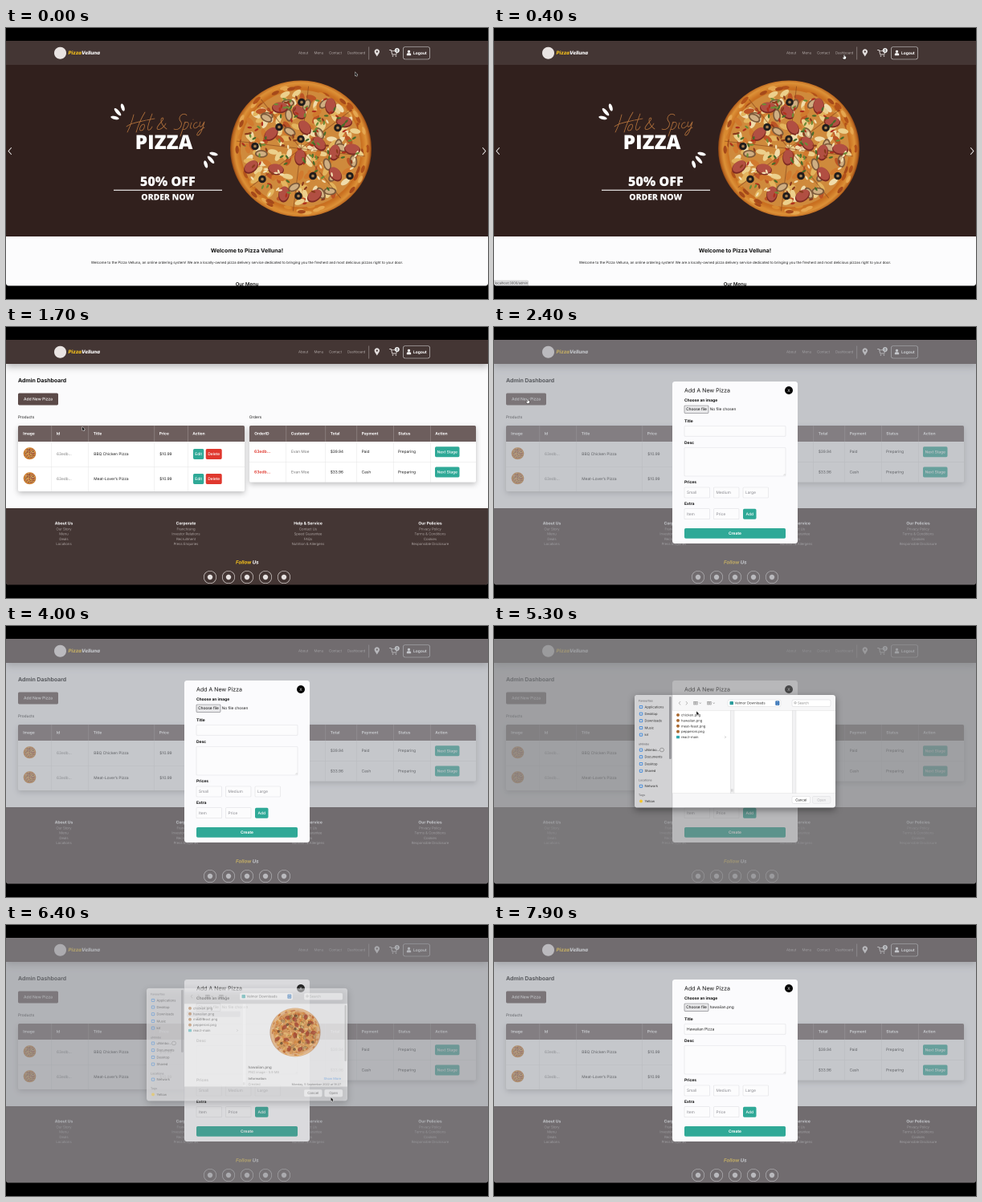
An HTML page with a canvas that plays this animation: 600 px wide and 338 px high, repeating every 8000 ms.

```html
<!DOCTYPE html>
<html lang="en">
<head>
<meta charset="utf-8">
<title>Pizza ordering dashboard</title>
<style>
html, body { margin: 0; width: 100%; height: 100%; overflow: hidden; background: #000; }
canvas { display: block; width: 600px; height: 338px; }
</style>
</head>
<body>
<canvas id="stage"></canvas>
<script>
const LOOP = 8000, BROWN = '#443634', TEAL = '#2fa997', RED = '#e0382e', YELLOW = '#f6c21c';
const canvas = document.getElementById('stage');
// Supersampled so that tiny text stays evenly spaced and soft.
const ratio = 2 * (window.devicePixelRatio || 1);
canvas.width = 600 * ratio;
canvas.height = 338 * ratio;
const ctx = canvas.getContext('2d');
ctx.textRendering = 'geometricPrecision';

const clamp = v => Math.max(0, Math.min(1, v));
const progress = (t, a, b) => clamp((t - a) / (b - a));
const ease = p => p * p * (3 - 2 * p);

function text(str, x, y, size, color = '#222', opts = {}) {
  const { weight = 400, align = 'left', italic = '', family = 'Inter' } = opts;
  ctx.font = `${italic} ${weight} ${size}px "${family}", sans-serif`;
  ctx.textAlign = align;
  ctx.textBaseline = opts.base || 'middle';
  ctx.fillStyle = color;
  ctx.fillText(str, x, y);
  return ctx.measureText(str).width;
}
const bold = (str, x, y, size, color, align) => text(str, x, y, size, color, { weight: 700, align });
const centered = (str, x, y, size, color, weight) => text(str, x, y, size, color, { weight, align: 'center' });

function rect(x, y, w, h, color) {
  ctx.fillStyle = color;
  ctx.fillRect(x, y, w, h);
}
function box(x, y, w, h, r, fill, stroke, width = .6) {
  ctx.beginPath();
  ctx.roundRect(x, y, w, h, r);
  if (fill) { ctx.fillStyle = fill; ctx.fill(); }
  if (stroke) { ctx.strokeStyle = stroke; ctx.lineWidth = width; ctx.stroke(); }
}
function disc(x, y, r, fill, stroke, width = .7) {
  ctx.beginPath();
  ctx.arc(x, y, r, 0, 7);
  if (fill) { ctx.fillStyle = fill; ctx.fill(); }
  if (stroke) { ctx.strokeStyle = stroke; ctx.lineWidth = width; ctx.stroke(); }
}
function oval(x, y, rx, ry, angle, fill) {
  ctx.beginPath();
  ctx.ellipse(x, y, rx, ry, angle, 0, 7);
  ctx.fillStyle = fill;
  ctx.fill();
}
function path(d, color, width = .8) {
  ctx.strokeStyle = color;
  ctx.lineWidth = width;
  ctx.lineCap = ctx.lineJoin = 'round';
  ctx.stroke(new Path2D(d));
}
function shadowed(draw, blur, dy, color) {
  ctx.save();
  ctx.shadowColor = color;
  ctx.shadowBlur = blur * ratio;
  ctx.shadowOffsetY = dy * ratio;
  draw();
  ctx.restore();
}
function button(label, x, y, w, h, color, size = 4.8, weight = 500) {
  box(x, y, w, h, 2, color);
  centered(label, x + w / 2, y + h / 2 + .2, size, '#fff', weight);
}

function pizza(cx, cy, radius) {
  let seed = 7;
  const rand = () => (seed = seed * 16807 % 2147483647) / 2147483647;
  const scatter = (n, inner, outer, draw) => {
    for (let i = 0; i < n; i++) {
      const a = rand() * 6.283, d = Math.sqrt(inner * inner + rand() * (outer * outer - inner * inner));
      draw(Math.cos(a) * d, Math.sin(a) * d * .97, rand() * 3.14, i);
    }
  };
  ctx.save();
  ctx.translate(cx, cy);
  ctx.scale(radius / 88, radius / 88);
  const crust = ctx.createRadialGradient(0, 0, 68, 0, 0, 88);
  crust.addColorStop(0, '#c4641c');
  crust.addColorStop(.4, '#cb7222');
  crust.addColorStop(.7, '#dd9238');
  crust.addColorStop(.9, '#b9651f');
  crust.addColorStop(1, '#7c3c14');
  oval(0, 0, 88, 85, 0, crust);
  scatter(60, 73, 84, (x, y, a, i) =>
    oval(x, y, 5, 2.2, Math.atan2(y, x) + 1.57, ['#b2521a', '#e5a650', '#a5491a', '#d98a30'][i % 4]));
  oval(0, 0, 75, 73, 0, '#cf8a3c');
  scatter(150, 0, 73, (x, y, a, i) =>
    oval(x, y, 6.5, 3.2, a, ['#ecd08c', '#d17a2e', '#f0dcab', '#bc5425', '#e3b45e'][i % 5]));
  for (let k = 0; k < 4; k++) {
    const a = .12 + k * Math.PI / 4, x = Math.cos(a) * 80, y = Math.sin(a) * 78;
    path(`M${-x} ${-y}L${x} ${y}`, 'rgba(130,65,25,.6)', 1);
  }
  scatter(18, 15, 68, (x, y, a) => {
    oval(x, y, 8, 4.8, a, '#7d5a3a');
    oval(x, y, 6, 3.2, a, '#cfae82');
  });
  const meat = [[-26, -52], [-2, -46], [37, -54], [-37, -19], [54, -34], [23, -7], [-1, 10], [-62, 22],
    [64, 0], [43, 31], [-21, 56], [17, 58], [-31, 25], [5, -27], [42, 4]];
  meat.forEach(([x, y], i) => {
    oval(x, y + 1, 10, 6.8, i * .8, '#7d2a22');
    oval(x, y, 9, 6, i * .8, '#b14f42');
  });
  scatter(150, 0, 72, (x, y, a, i) =>
    oval(x, y, 2.8, 1.2, a, ['#6d8c35', '#b0301d', '#486b29', '#f3e0b2', '#8a3b1c'][i % 5]));
  const olives = [[1, -58], [46, -26], [-57, -3], [0, -12], [-48, 38], [15, 34], [61, 34], [-3, 59], [-27, -27]];
  olives.forEach(([x, y]) => {
    disc(x, y, 4.8, '#211d1c');
    disc(x, y, 1.8, '#a87f4d');
  });
  ctx.restore();
}

function header() {
  rect(0, 16, 600, 30, BROWN);
  disc(67.5, 31.2, 7.5, '#e9e4e2');
  const brand = { weight: 800, italic: 'italic' };
  const w = text('Pizza', 77.5, 31.3, 6.1, YELLOW, brand);
  text('Velluna', 77.5 + w, 31.3, 6.1, '#fff', brand);
  [['About', 364], ['Menu', 383.5], ['Contact', 402], ['Dashboard', 425]]
    .forEach(([s, x]) => text(s, x, 31.2, 4.4, '#cfc8c6', { weight: 300 }));
  rect(451.5, 23.5, .6, 16, '#a99f9d');
  ctx.fillStyle = '#e4dfde';
  ctx.fill(new Path2D('M461.8 35.5C460 32.5 458.6 31 458.6 29.5A3.2 3.2 0 0 1 465 29.5C465 31 463.6 32.5 461.8 35.5Z'));
  disc(461.8, 29.5, 1.1, BROWN);
  path('M477.5 27.5h1.8l1.5 5.5h5l1.2-4.3h-7.2', '#ddd6d4', .9);
  disc(481.5, 35, .8, '#ddd6d4');
  disc(485.5, 35, .8, '#ddd6d4');
  disc(486.8, 28, 3, '#fff');
  centered('0', 486.8, 28.3, 4.4, '#222', 600);
  box(494.5, 23.5, 33, 15.5, 2.5, null, '#ddd', .6);
  disc(501.5, 29.3, 1.6, '#fff');
  box(498.8, 31.3, 5.4, 3, [2, 2, .5, .5], '#fff');
  bold('Logout', 507, 31.4, 4.9, '#fff');
}

const LETTERING = 'M159 108C157 116 154 124 151 130M173 105C168 113 164 123 162 130M150 123C156 118 168 117 174 115'
  + 'M171 120c-4 1-6 8-3 8c4 0 6-8 3-8M182 107C179 115 175 125 177 127c2 1 4-2 5-4M175 115l10-2'
  + 'M200 126C193 121 191 113 195 112C199 113 188 121 188 125C189 129 196 125 199 119'
  + 'M225 109C221 104 213 111 217 116C221 120 216 129 209 126M223 117L217 135M222 119c4-4 7 0 4 4c-2 4-6 4-6 3'
  + 'M231 118c-2 5-2 8 0 7M233 114v.3M238 118c-4-1-6 6-3 7c2 0 4-2 5-3'
  + 'M242 117c-2 5-1 8 2 5l3-5c-2 8-5 16-8 17c-4 0 2-7 8-10';

function sparks() {
  oval(135.5, 112, 5.3, 2, .25, '#fff');
  oval(139, 104.7, 6, 2.1, .85, '#fff');
  oval(145.3, 99, 4.8, 2.1, 1.25, '#fff');
}

function home(t) {
  rect(0, 16, 600, 306, '#fcfcfd');
  rect(0, 46, 600, 214, '#31201d');
  header();
  path(LETTERING, '#b5733c', .8);
  sparks();
  ctx.save();
  ctx.translate(394, 269);
  ctx.rotate(Math.PI);
  sparks();
  ctx.restore();
  const display = (s, x, y, size) => text(s, x, y, size, '#fff',
    { weight: 800, align: 'center', family: 'Open Sans', base: 'alphabetic' });
  display('PIZZA', 196.5, 150.8, 24.5);
  display('50% OFF', 201.3, 197.2, 16.2);
  display('ORDER NOW', 201.3, 214.6, 10.4);
  rect(134, 201.7, 135, 1.1, '#fff');
  pizza(367, 150.5, 88);
  path('M6.5 149.5L3 153.5L6.5 157.5M593.5 149.5L597 153.5L593.5 157.5', '#fff', .9);
  bold('Welcome to Pizza Velluna!', 300, 277.7, 7, '#111', 'center');
  centered('Welcome to the Pizza Velluna, an online ordering system! We are a locally-owned pizza delivery service '
    + 'dedicated to bringing you the freshest and most delicious pizzas right to your door.', 300, 292.7, 4.4, '#222');
  centered('Our Menu', 300, 319.6, 6, '#111', 600);
  if (t >= 300) {
    box(-1, 315, 43.5, 8, 1, '#dedee0', '#aaa', .4);
    text('localhost:3000/admin', 1, 318.5, 4, '#444');
  }
}

function table(x, widths, heads, rowHeight) {
  const h = 20 + rowHeight * 2;
  shadowed(() => box(x, 123, 282, h, 2, '#fff'), 7, 2.5, 'rgba(0,0,0,.24)');
  box(x, 123, 282, 20, [2, 2, 0, 0], '#6d5e5d');
  rect(x, 143 + rowHeight, 282, .5, '#e5e5e5');
  let left = x;
  heads.forEach((head, i) => {
    bold(head, left + 6.3, 133.2, 4.8, '#fff');
    if (i) {
      rect(left, 123, .6, 20, '#9a8f8e');
      rect(left, 143, .5, rowHeight * 2, '#e5e5e5');
    }
    left += widths[i];
  });
}

const LINKS = [
  ['About Us', 'Our Story', 'Menu', 'Deals', 'Locations'],
  ['Corporate', 'Franchising', 'Investor Relations', 'Recruitment', 'Press Enquiries'],
  ['Help & Service', 'Contact Us', 'Speed Guarantee', 'FAQs', 'Nutrition & Allergens'],
  ['Our Policies', 'Privacy Policy', 'Terms & Conditions', 'Cookies', 'Responsible Disclosure']
];

function dashboard() {
  rect(0, 16, 600, 306, '#fbfbfc');
  shadowed(() => rect(0, 16, 600, 30, BROWN), 9, 3, 'rgba(0,0,0,.3)');
  header();
  bold('Admin Dashboard', 15, 66.7, 6.9, '#111');
  button('Add New Pizza', 15, 82.5, 50, 15, '#5b4a48', 5);
  text('Products', 15, 112.7, 4.8);
  text('Orders', 302.7, 112.7, 4.8);

  table(15, [41.5, 46, 82, 41.5, 71], ['Image', 'Id', 'Title', 'Price', 'Action'], 31);
  ['BBQ Chicken Pizza', 'Meat-Lover\u2019s Pizza'].forEach((title, i) => {
    const y = 158.5 + i * 31;
    pizza(29.5, y - .8, 7.7);
    text('63edb...', 63, y, 4.8, '#888');
    text(title, 109.3, y, 4.8);
    text('$10.99', 191.3, y, 4.8);
    button('Edit', 233, y - 6.5, 13.3, 13, TEAL);
    button('Delete', 248.7, y - 6.5, 20, 13, RED);
  });

  table(303, [45.5, 49, 39, 45.5, 46, 57], ['OrderID', 'Customer', 'Total', 'Payment', 'Status', 'Action'], 25.3);
  [['$39.94', 'Paid'], ['$33.96', 'Cash']].forEach(([total, payment], i) => {
    const y = 155.7 + i * 25.3;
    text('63edb...', 309, y, 5, RED, { weight: 600 });
    text('Evan Moe', 355, y, 4.8, '#777');
    text(total, 403.7, y, 4.8);
    text(payment, 442.6, y, 4.8);
    text('Preparing', 488, y, 4.8);
    button('Next Stage', 534, y - 6.5, 30.5, 13, TEAL);
  });

  rect(0, 226, 600, 96, BROWN);
  LINKS.forEach(([head, ...links], i) => {
    const x = 72 + i * 152;
    bold(head, x, 245.2, 5, '#fff', 'center');
    links.forEach((s, k) => centered(s, x, 252.2 + k * 6.25, 4.3, '#c9c1bf', 300));
  });
  const follow = { weight: 700, italic: 'italic' };
  const w = text('Follow', 286, 293.5, 6.1, YELLOW, follow);
  text(' Us', 286 + w, 293.5, 6.1, '#fff', follow);
  for (let i = 0; i < 5; i++) {
    disc(254 + i * 23, 312, 7.7, null, '#d5cecc', .7);
    disc(254 + i * 23, 312, 3.2, '#e6e1e0');
  }
}

function input(x, y, w, h, placeholder = '') {
  box(x, y, w, h, 1, '#fcfcfd', '#e2e2e5', .6);
  text(placeholder, x + 3, y + h / 2 + .2, 4.8, '#8c8c92');
}

function modal(t) {
  rect(0, 16, 600, 306, 'rgba(150,153,160,.55)');
  box(222, 68, 156, 202, 3, '#fbfbfd');
  text('Add A New Pizza', 237, 79.4, 7, '#111');
  disc(367, 79, 5, '#000');
  centered('X', 367, 79.3, 5, '#fff');
  [['Choose an image', 91.7], ['Title', 117.6], ['Desc', 144.3], ['Prices', 193.7], ['Extra', 220.7]]
    .forEach(([s, y]) => bold(s, 237, y, 4.9, '#111'));
  box(237, 98, 30, 9.3, .8, '#e9e9eb', '#77777b', .6);
  centered('Choose file', 252, 102.8, 4.8, '#111');
  text(t >= 6500 ? 'hawaiian.png' : 'No file chosen', 268.6, 102.8, 4.8, '#222');
  input(237, 123.5, 126, 12.7);
  input(237, 150.5, 126, 35.5);
  path('M360.5 185l1.8-1.8M361.8 185l.6-.6', '#aaa', .4);
  [['Small', 237], ['Medium', 273.5], ['Large', 310]].forEach(([s, x]) => input(x, 200, 31.5, 13, s));
  [['Item', 237], ['Price', 273.5]].forEach(([s, x]) => input(x, 226.7, 31.5, 13, s));
  button('Add', 310, 226.7, 16.5, 13, TEAL, 4.9);
  button('Create', 237, 251, 126, 12.7, TEAL, 4.9, 700);

  if (t >= 6800) {
    const title = 'Hawaiian Pizza';
    const typed = title.slice(0, Math.floor(Math.max(0, t - 6900) / 68));
    const w = text(typed, 240, 130, 4.8);
    if (typed.length < title.length) rect(240.3 + w, 127, .5, 6, '#222');
  }
}

const PLACES = [
  ['Applications', 101], ['Desktop', 109.6], ['Downloads', 118.3], ['Music', 127], ['krl', 135.6],
  ['uNimbo...', 154.6], ['Documents', 163.3], ['Desktop', 172], ['Shared', 180.7], ['Network', 199.7], ['Yellow', 218.5]
];

function fileDialog(t) {
  const open = ease(progress(t, 4800, 5000)), close = progress(t, 6300, 6500);
  const shown = open * (1 - close);
  if (!shown) return;
  rect(0, 16, 600, 306, `rgba(130,130,132,${.55 * shown})`);
  const picked = t >= 5950;
  ctx.save();
  ctx.globalAlpha = shown;
  ctx.translate(0, -14 * close - 10 * (1 - open));
  shadowed(() => box(175, 86, 250, 140.5, 3, '#f7f7f8'), 9, 3, 'rgba(0,0,0,.4)');
  ctx.beginPath();
  ctx.roundRect(175, 86, 250, 140.5, 3);
  ctx.clip();

  rect(175, 86, 47, 141, '#d2d2d4');
  rect(221.7, 86, .5, 141, '#b5b5b8');
  box(218, 88, 2.8, 78, 1.4, '#96969a');
  [['Favourites', 93.7], ['uNimbo', 147.6], ['Locations', 192.5], ['Tags', 211]]
    .forEach(([s, y]) => text(s, 180, y, 3.5, '#77777b', { weight: 600 }));
  PLACES.forEach(([s, y]) => {
    if (s === 'Yellow') disc(183, y, 1.9, '#f4c62d');
    else box(181.2, y - 1.6, 3.6, 3.2, .8, null, '#2c80df', .8);
    text(s, 187.5, y + .2, 4.1, '#333');
  });
  disc(209, 154.5, 2.4, null, '#777', .6);

  path('M232 94.2l-1.8 2 1.8 2M239 94.2l1.8 2-1.8 2', '#aaa', .7);
  [251, 268].forEach(x => {
    for (let i = 0; i < 3; i++) box(x - 2.5 + i * 1.8, 94.3, 1.3, 3.8, .2, null, '#666', .4);
    path(`M${x + 4.7} 95.7l1 1 1-1`, '#666', .5);
  });
  box(291, 92, 66, 8.5, 1.8, '#fff', '#d9d9db', .5);
  box(293.5, 94, 4.5, 4.3, .8, '#2b9c9c');
  text('Velmor Downloads', 299.5, 96.3, 4.3, '#333');
  box(350.3, 93.4, 5, 5.6, 1, '#2f6fb5');
  path('M351.7 95.4l1.1-1 1.1 1M351.7 97.2l1.1 1 1.1-1', '#fff', .5);
  box(371, 92, 48, 8.5, 1.8, '#fff', '#d5d5d8', .5);
  disc(375, 95.9, 1.2, null, '#777', .5);
  text('Search', 378, 96.4, 4.2, '#888');

  rect(222, 105, 203, .5, '#ddd');
  rect(222, 105.5, 203, 103, '#fff');
  rect(294, 105.5, 5, 103, '#f2f2f3');
  rect(294, 105.5, .5, 103, '#ddd');
  rect(298.7, 105.5, .5, 103, '#ddd');
  path('M295.8 203.5v3M297 203.5v3', '#999', .4);
  if (picked) box(225, 114.7, 66.5, 7, 1, '#d6d6d8');
  ['chicken.png', 'hawaiian.png', 'meat-feast.png', 'pepperoni.png', 'react-main'].forEach((s, i) => {
    const y = 111 + i * 6.9;
    if (i < 4) disc(229, y, 1.9, '#a8682f');
    else box(227, y - 1.7, 4, 3.4, .6, '#30a8ae');
    text(s, 233, y + .2, 4.2, '#333');
  });
  path('M287.5 137.6l1 1-1 1', '#888', .5);

  if (picked) {
    pizza(360, 141, 31.5);
    text('hawaiian.png', 301.5, 184.7, 4.5, '#333', { weight: 600 });
    text('PNG image - 5.9 MB', 301.5, 191, 4, '#888');
    text('Information', 301.5, 198.9, 4, '#333', { weight: 600 });
    text('Show More', 417, 198.9, 4, '#2c80df', { align: 'right' });
    text('Created', 301.5, 206, 4, '#888');
    text('Monday, 5 September 2022 at 18:27', 417, 206, 3.6, '#333', { align: 'right' });
    box(421.5, 107, 2.3, 70, 1.1, '#aaa');
  } else {
    rect(371, 105.5, 5, 103, '#f2f2f3');
    rect(371, 105.5, .5, 103, '#ddd');
    rect(375.7, 105.5, .5, 103, '#ddd');
  }
  rect(222, 208.5, 203, .5, '#ddd');
  box(371, 212.3, 22.5, 9, 1.8, '#fff', '#d6d6d8', .5);
  box(396.5, 212.3, 22.5, 9, 1.8, picked ? '#fff' : '#f3f3f4', '#dedee0', .5);
  centered('Cancel', 382.3, 217, 4.3, '#222');
  centered('Open', 407.7, 217, 4.3, picked ? '#222' : '#b5b5b8');
  ctx.restore();
}

// time, x, y of each pointer stop
const TRACK = [
  [0, 434.5, 55], [100, 434.5, 55], [350, 436, 33.5], [750, 436, 33.5], [1500, 95, 124.5], [1750, 95, 124.5],
  [2150, 42, 90], [2500, 42, 90], [3300, 262, 103], [4700, 252, 102], [5100, 252, 102],
  [5700, 252.5, 118.5], [5980, 252.5, 118.5], [6250, 404.5, 215], [6450, 404.5, 215], [6780, 262, 129]
];

function pointer(t) {
  if (t > 6850 || (t > 3400 && t < 4150)) return;
  let i = 0;
  while (i < TRACK.length - 2 && t >= TRACK[i + 1][0]) i++;
  const [t0, x0, y0] = TRACK[i], [t1, x1, y1] = TRACK[i + 1];
  const p = ease(progress(t, t0, t1));
  const hand = (t > 300 && t < 800) || (t > 2100 && t < 2550);
  ctx.save();
  ctx.translate(x0 + (x1 - x0) * p, y0 + (y1 - y0) * p);
  ctx.scale(.9, .9);
  const shape = new Path2D(hand
    ? 'M-.6 0h1.1v2l2 .5v2l-.8 1.4h-2.6l-1.4-2 .6-.4 1.1.7z'
    : 'M0 0v5l1.2-1 .8 1.8.9-.4-.8-1.7h1.5z');
  ctx.lineWidth = .8;
  ctx.strokeStyle = hand ? '#111' : '#fff';
  ctx.stroke(shape);
  ctx.fillStyle = hand ? '#fff' : '#111';
  ctx.fill(shape);
  ctx.restore();
}

function frame(now) {
  const t = now % LOOP;
  ctx.setTransform(ratio, 0, 0, ratio, 0, 0);
  rect(0, 0, 600, 338, '#000');
  ctx.save();
  ctx.beginPath();
  ctx.roundRect(0, 16, 600, 305.5, [0, 0, 3, 3]);
  ctx.clip();
  if (t < 700) home(t);
  else dashboard();
  if (t >= 2300) modal(t);
  fileDialog(t);
  pointer(t);
  ctx.restore();
  requestAnimationFrame(frame);
}
requestAnimationFrame(frame);
</script>
</body>
</html>
```
